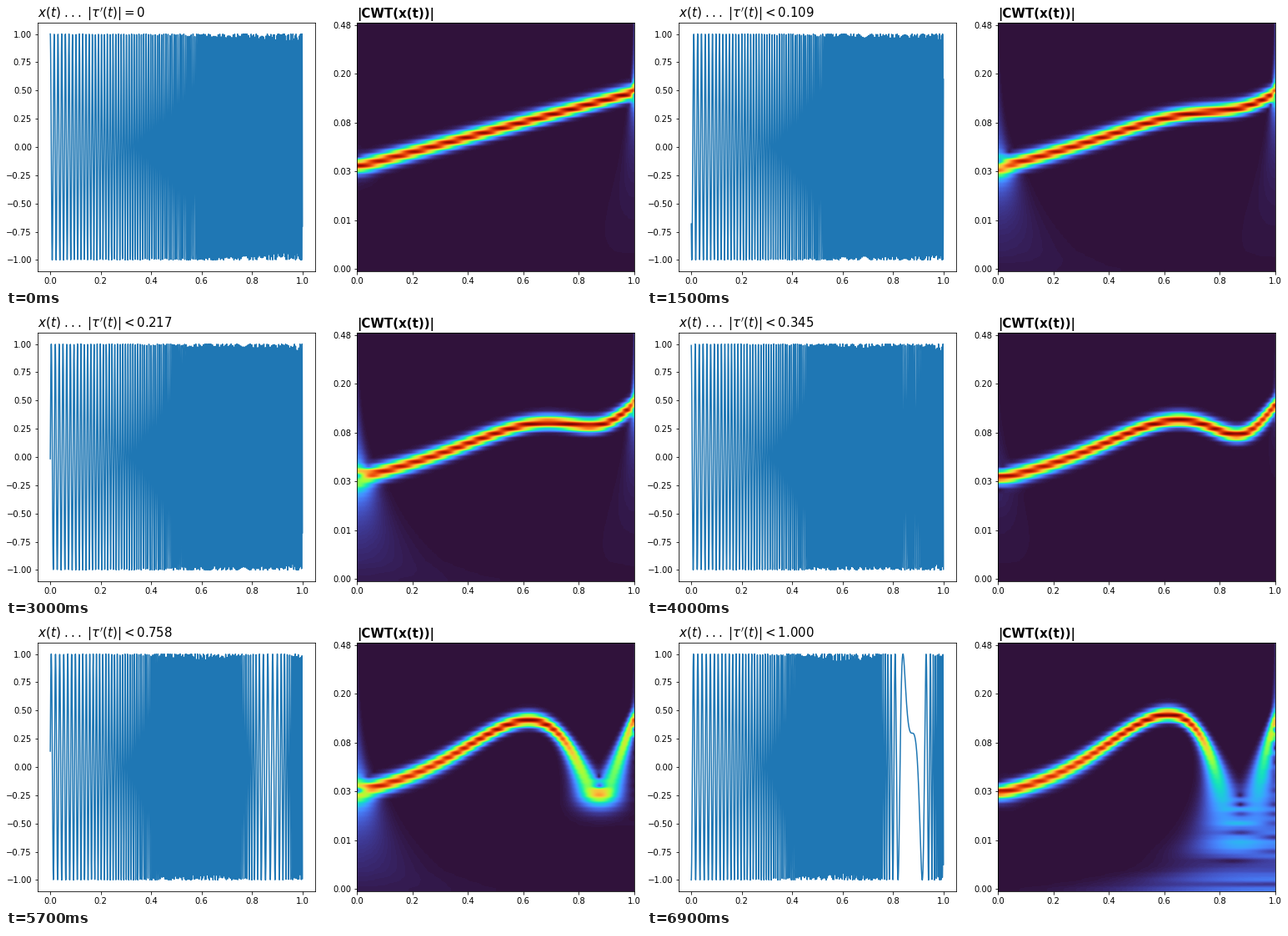
These frames come from a looping animation (762x338 px, 7 s). A matplotlib script:

```python
import matplotlib.pyplot as plt
import numpy as np
from matplotlib.animation import FuncAnimation

W, H, DPI = 762, 338, 72
FRAMES, INTERVAL = 70, 100

N = 2048
F_MIN, F_MAX = 64, 256        # chirp range in cycles per unit time
ROWS, VOICES = 53, 8          # scales of the transform, scales per octave
TOP_FREQ = 885                # centre frequency of the first row
COARSE_FROM = 49              # low rows are spaced twice as wide
BETA, GAMMA = 60, 3           # generalized Morse wavelet

t = np.arange(N) / N
slope_peak = np.abs(4 * np.pi * t * np.sin(2 * np.pi * t**2)).max()


def warp_slope(i):
    """Largest |tau'(t)|: linear, then geometric, then linear up to 1."""
    if i < 30:
        return 0.00724 * i
    if i < 60:
        return 0.345 * 1.0474 ** (i - 40)
    last = 0.345 * 1.0474 ** 19
    return last + (1 - last) * (i - 59) / 10


def warped_chirp(slope):
    tau = slope / slope_peak * np.cos(2 * np.pi * t**2)
    rate = np.log(F_MAX / F_MIN)
    return np.cos(2 * np.pi * F_MIN * np.expm1(rate * (t - tau)) / rate)


def wavelet_bank():
    row = np.arange(ROWS)
    octave = (row + np.maximum(row - COARSE_FROM + 1, 0)) / VOICES
    centre = TOP_FREQ * 2.0 ** -octave
    freq = np.arange(1, N + 1) / 2
    ratio = freq[None, :] / centre[:, None]
    bank = np.zeros((ROWS, 2 * N))
    bank[:, 1:N + 1] = 2 * np.exp(BETA * np.log(ratio)
                                  - BETA / GAMMA * (ratio**GAMMA - 1))
    return bank


BANK = wavelet_bank()


def cwt_abs(x):
    spectrum = np.fft.fft(np.pad(x, N // 2, mode="reflect"))
    full = np.fft.ifft(BANK * spectrum, axis=1)
    return np.abs(full[:, N // 2:N // 2 + N])


def title_text(i):
    bound = "=0" if i == 0 else f"<{warp_slope(i):.3f}"
    return rf"$x(t)\ ...\ |\tau'(t)|{bound}$"


def add_panel(left):
    return fig.add_axes([left / W, 20 / H, 333 / W, 298 / H])


fig = plt.figure(figsize=(W / DPI, H / DPI), dpi=DPI, facecolor="white")

signal_ax = add_panel(38)
signal_ax.set(xlim=(-0.05, 1.05), ylim=(-1.1, 1.1))
signal_ax.set_xticks(np.linspace(0, 1, 6))
signal_ax.set_yticks(np.linspace(-1, 1, 9))
line, = signal_ax.plot(t, warped_chirp(0), color="#1f77b4", lw=1.5)
title = signal_ax.set_title(title_text(0), loc="left", fontsize=15)

cwt_ax = add_panel(421)
image = cwt_ax.imshow(cwt_abs(warped_chirp(0)), cmap="turbo", aspect="auto",
                      interpolation="hanning",
                      extent=(0, 1, ROWS - 0.5, -0.5))
cwt_ax.set_xticks(np.linspace(0, 1, 6))
cwt_ax.set_yticks(np.linspace(0, ROWS - 1, 6),
                  ["0.48", "0.20", "0.08", "0.03", "0.01", "0.00"])
cwt_ax.set_title("|CWT(x(t))|", loc="left", fontsize=15, weight="bold")


def update(i):
    x = warped_chirp(warp_slope(i))
    power = cwt_abs(x)
    line.set_ydata(x)
    title.set_text(title_text(i))
    image.set_data(power)
    image.set_clim(0, power.max())
    return line, title, image


anim = FuncAnimation(fig, update, frames=FRAMES, interval=INTERVAL,
                     repeat=True, repeat_delay=0)
plt.show()
```
